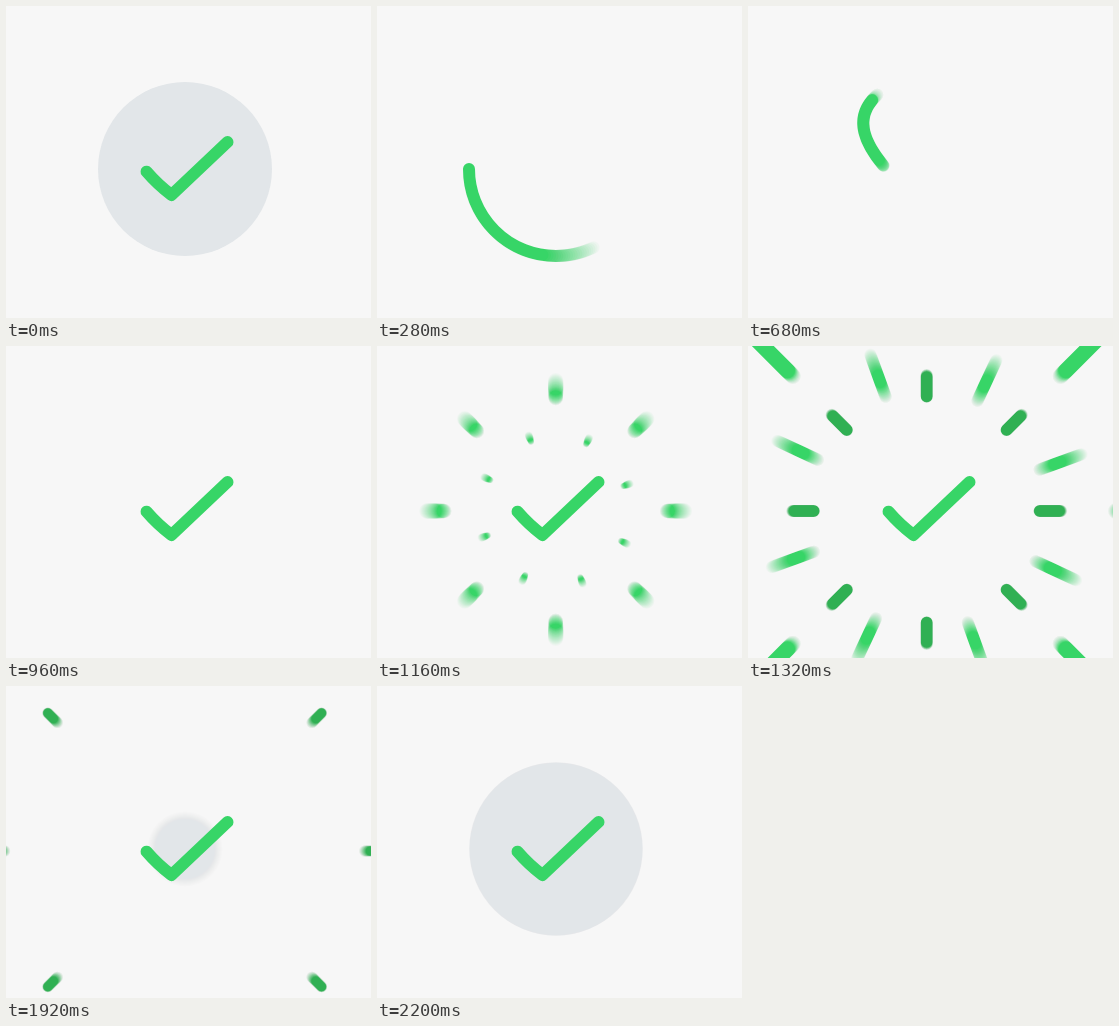
An HTML page with a canvas for the animation above (2480 ms loop, 365x312 px).

```html
<!DOCTYPE html>
<html lang="en">
<head>
<meta charset="utf-8">
<title>Success check</title>
<style>
html, body { margin: 0; width: 100%; height: 100%; overflow: hidden; background: #f7f7f7; }
canvas { display: block; }
</style>
</head>
<body>
<canvas id="stage" width="365" height="312"></canvas>
<script>
const W = 365, H = 312, LOOP = 2480, STEP = 40, START = 200;
const SHUTTER = 36, SAMPLES = 24;
const BG = '#f7f7f7', DISC = '#e2e6e9', GREEN = '#37d567', DARK = '#30b053';
const CX = 178.7, CY = 163.5;

const out = document.getElementById('stage').getContext('2d');
const layer = document.createElement('canvas');
layer.width = W;
layer.height = H;
const ctx = layer.getContext('2d');

// Progress from t0 to t1: easing out, or easing in and out.
const span = (t, t0, t1) => Math.min(1, Math.max(0, (t - t0) / (t1 - t0)));
const easeOut = (t, t0, t1) => 1 - (1 - span(t, t0, t1)) ** 2;
const sway = (t, t0, t1) => (1 - Math.cos(Math.PI * span(t, t0, t1))) / 2;

// One stroke: round the ring counter-clockwise, curl inwards, end as the check.
const lead = 'M92 163A87 87 0 1 0 179 76C150 75 137 81 128 90C104 113 117 139 140 165';
const full = lead + 'Q151.5 178.5 165.5 189L221.5 136';
const stroke = new Path2D(full);

function measure(d) {
  const p = document.createElementNS('http://www.w3.org/2000/svg', 'path');
  p.setAttribute('d', d);
  return p.getTotalLength();
}
const checkAt = measure(lead), total = measure(full);
const ringEnd = 340, curlHead = checkAt - 8, curlTail = checkAt - 81;

function drawStroke(t) {
  const head = ringEnd * easeOut(t, 200, 520)
    + (curlHead - ringEnd) * sway(t, 480, 690)
    + (total - curlHead) * sway(t, 690, 900);
  const tail = curlTail * sway(t, 350, 690)
    + (checkAt - curlTail) * sway(t, 690, 860);
  if (head - tail < 0.1) return;
  ctx.strokeStyle = GREEN;
  ctx.lineWidth = 12;
  ctx.setLineDash([head - tail, total * 2]);
  ctx.lineDashOffset = -tail;
  ctx.stroke(stroke);
  ctx.setLineDash([]);
}

// Rays pop up, grow outwards, then the tail runs into the head.
// Radii of tail and head: at birth, after the pop, after growing.
const bursts = [
  {
    color: GREEN, turn: 0, width: 15.5,
    pop: [1000, 1200], grow: [1140, 1340], leave: [1320, 1520],
    tail: [60, 116, 196], head: [60, 116, 276]
  },
  {
    color: GREEN, turn: 25, width: 12,
    pop: [1080, 1320], grow: [1130, 1560], leave: [1640, 1840],
    tail: [68, 76, 203], head: [68, 76, 264]
  },
  {
    color: DARK, turn: 0, width: 12,
    pop: [1180, 1340], grow: [1310, 1640], leave: [1640, 2040],
    tail: [106, 113, 142.5], head: [106, 133.5, 193.5]
  }
];

function drawBurst(b, t) {
  if (t <= b.pop[0] || t >= b.leave[1]) return;
  const pop = easeOut(t, ...b.pop), grow = sway(t, ...b.grow), leave = sway(t, ...b.leave);
  const reach = ([r0, r1, r2]) => r0 + (r1 - r0) * pop + (r2 - r1) * grow;
  const head = reach(b.head);
  let tail = reach(b.tail);
  tail += (head - tail) * leave;

  ctx.strokeStyle = b.color;
  ctx.lineWidth = b.width * pop * (1 - leave ** 8);
  ctx.beginPath();
  for (let k = 0; k < 8; k++) {
    const a = (b.turn + 45 * k) * Math.PI / 180;
    const c = Math.cos(a), s = Math.sin(a);
    const y = CY + 1.5 * c ** 4; // flat rays sit slightly lower
    ctx.moveTo(CX + c * tail, y + s * tail);
    ctx.lineTo(CX + c * head, y + s * head);
  }
  ctx.stroke();
}

function drawScene(t) {
  ctx.fillStyle = BG;
  ctx.fillRect(0, 0, W, H);
  ctx.lineCap = ctx.lineJoin = 'round';
  ctx.fillStyle = DISC;
  ctx.beginPath();
  ctx.arc(179, 163, 87 * easeOut(t, 1840, 2240), 0, Math.PI * 2);
  ctx.fill();
  bursts.forEach(b => drawBurst(b, t));
  drawStroke(t);
}

// Motion blur: a running average over the shutter time.
function render(time) {
  let t = Math.floor(time % LOOP / STEP) * STEP;
  if (t < START) t += LOOP;
  for (let i = 0; i < SAMPLES; i++) {
    const shift = ((i + 0.5) / SAMPLES - 0.5) * SHUTTER;
    drawScene(Math.max(START, t + shift));
    out.globalAlpha = 1 / (i + 1);
    out.drawImage(layer, 0, 0);
  }
}

let begin = null, last = -1;
function tick(now) {
  if (begin === null) begin = now;
  const time = Math.max(0, now - begin), step = Math.floor(time % LOOP / STEP);
  if (step !== last) {
    last = step;
    render(time);
  }
  requestAnimationFrame(tick);
}
render(0);
requestAnimationFrame(tick);
</script>
</body>
</html>
```
